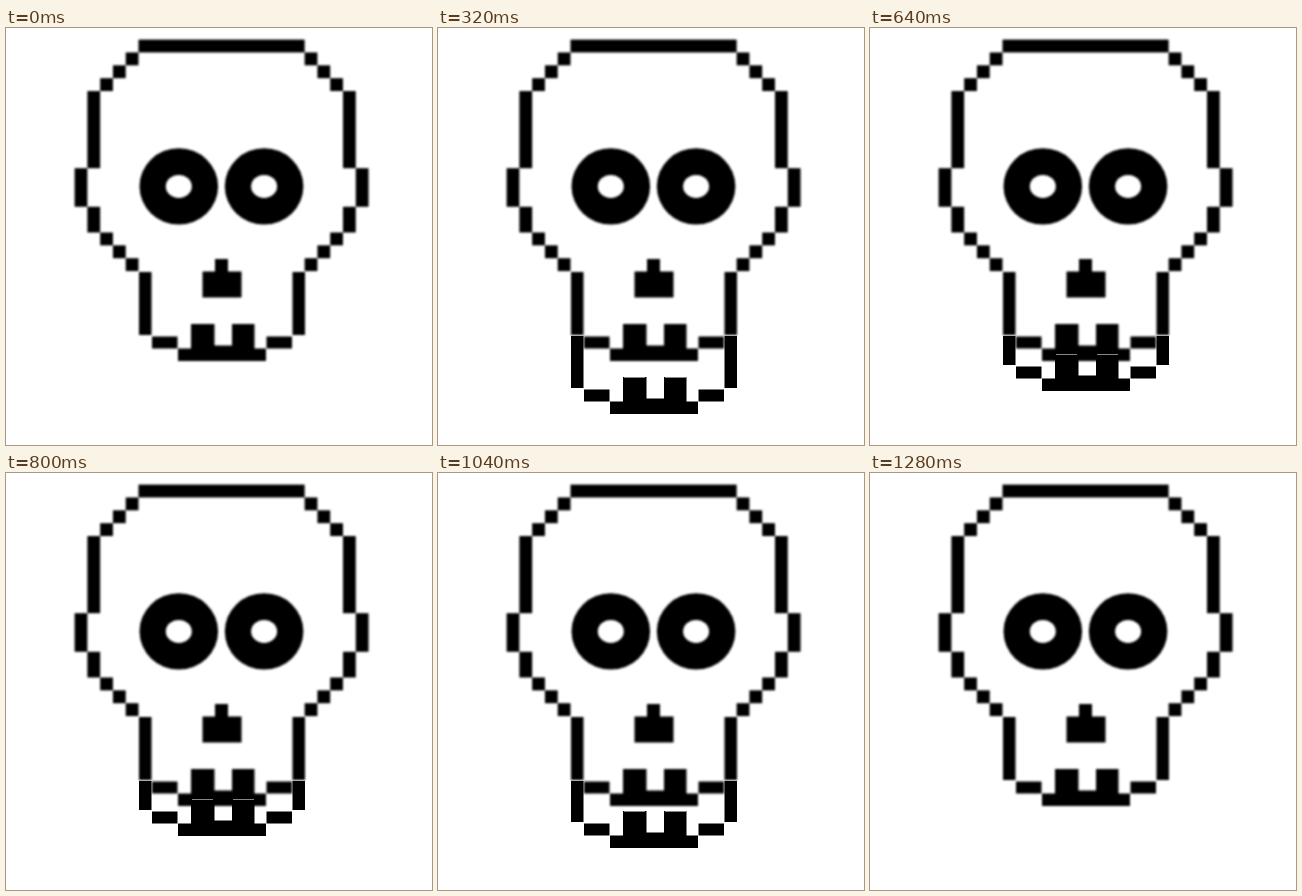
An HTML page for the animation above (1.36 s loop, 426 by 417 pixels).

```html
<!DOCTYPE html>
<html lang="en">
<head>
<meta charset="utf-8">
<title>Chattering skull</title>
<style>
  html, body { margin: 0; width: 100%; height: 100%; overflow: hidden; background: #fff; }
  svg { display: block; width: 426px; height: 417px; }
  .soft { filter: blur(1px); }
  .crisper { filter: blur(.7px); }
  .seam { fill: none; stroke: #aaa; stroke-width: .8; }
</style>
</head>
<body>
<svg viewBox="0 0 426 417">
  <defs>
    <clipPath id="below"><path d="M0 308H426V417H0Z"/></clipPath>
    <g id="mouth">
      <path d="M133 244h12.500v63h-12.500zM286.500 244h12.500v63h-12.500z"/>
      <path d="M146 308.500h25.500v12h-25.500zM260.500 308.500h25.500v12h-25.500z"/>
      <path d="M172 333V320.500H185V296H208.500V317.500H226V296H248.500V320.500H260V333Z"/>
    </g>
  </defs>
  <g class="soft">
    <g id="cranium"></g>
    <g id="eyes"></g>
    <path d="M209 231h13v12.500h13.500v26h-39v-26h12.500z"/>
    <use href="#mouth"/>
  </g>
  <g id="lower" clip-path="url(#below)">
    <g id="jaw">
      <use class="crisper" href="#mouth"/>
      <path class="seam" d="M186 296.500h21M227 296.500h21"/>
    </g>
  </g>
  <path id="hinge" class="seam" d="M133 307.500h12.500M286.500 307.500h12.500"/>
</svg>
<script>
const NS = 'http://www.w3.org/2000/svg';
const byId = id => document.getElementById(id);

function add(parent, tag, attrs) {
  const el = document.createElementNS(NS, tag);
  for (const key in attrs) el.setAttribute(key, attrs[key]);
  byId(parent).append(el);
}

// Blocks on the skull's own pixel grid: column, row, width, height
const CELL_X = 12.78, CELL_Y = 12.86, LEFT = 68.6, TOP = 11.6, COLS = 23;
function block(col, row, w, h) {
  add('cranium', 'rect', {
    x: LEFT + col * CELL_X, y: TOP + row * CELL_Y,
    width: w * CELL_X, height: h * CELL_Y
  });
}
function pair(col, row, h) {
  block(col, row, 1, h);
  block(COLS - 1 - col, row, 1, h);
}

block(5, 0, 13, 1);
for (let i = 0; i < 3; i++) {
  pair(4 - i, 1 + i, 1);
  pair(2 + i, 15 + i, 1);
}
pair(1, 4, 6);
pair(0, 10, 3);
pair(1, 13, 2);

for (const cx of [172.8, 258.1]) {
  add('eyes', 'ellipse', { cx, cy: 158.4, rx: 39.3, ry: 38.2 });
  add('eyes', 'ellipse', { cx, cy: 158.4, rx: 13, ry: 11.5, fill: '#fff' });
}

// Jaw drop in px, one entry per 80 ms
const DROP = [0, 18, 30, 42, 53, 42, 30, 42, 30, 42, 30, 42, 30, 42, 30, 18, 0];
const STEP = 80;

function play(el, pose) {
  const frames = DROP.map((d, i) => ({
    ...pose(d), offset: i / DROP.length, easing: 'steps(1, end)'
  }));
  frames.push({ ...pose(DROP[0]), offset: 1 });
  el.animate(frames, { duration: STEP * DROP.length, iterations: Infinity }).startTime = 0;
}

const shown = d => ({ opacity: d ? 1 : 0 });
play(byId('jaw'), d => ({ transform: `translate(0px, ${d}px)` }));
play(byId('lower'), shown);
play(byId('hinge'), shown);
</script>
</body>
</html>
```
